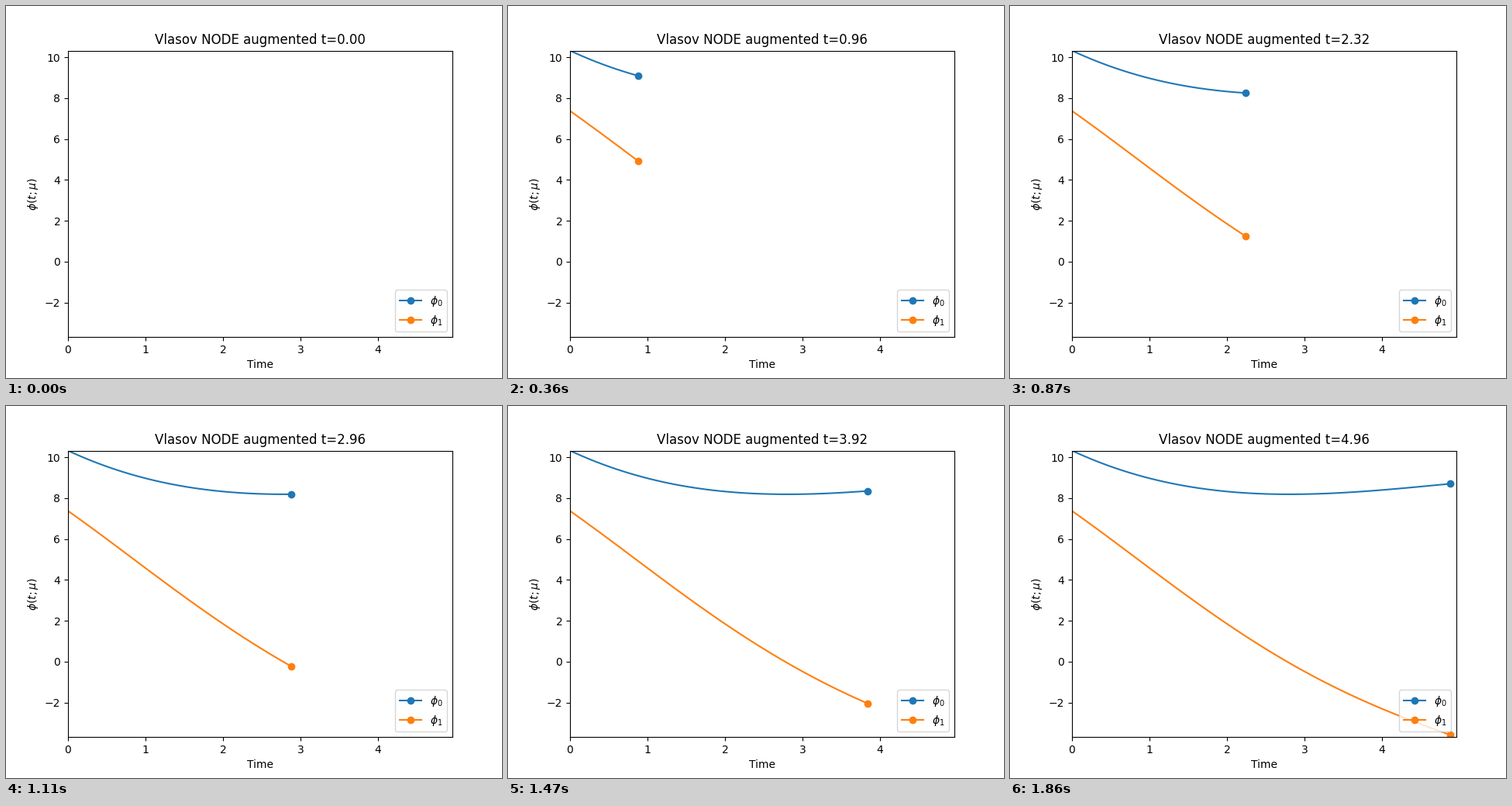
A matplotlib script for the animation above (1890 ms loop, 640 by 480 pixels).

```python
import numpy as np
import matplotlib.pyplot as plt
from matplotlib.animation import FuncAnimation

FRAMES = 63
DT = 0.08
t = np.arange(FRAMES) * DT

phi_0 = 10.327 - 1.7688 * t + 0.4466 * t**2 - 0.0312 * t**3
phi_1 = 7.375 - 2.662 * t - 0.2365 * t**2 + 0.1118 * t**3 - 0.0094 * t**4
curves = [phi_0, phi_1]

fig, ax = plt.subplots(figsize=(6.4, 4.8), dpi=100)
# Only the newest point of each line carries a marker
lines = [
    ax.plot([], [], "-o", markevery=slice(-1, None), label=rf"$\phi_{i}$")[0]
    for i in range(len(curves))
]
ax.set_xlim(t[0], t[-1])
ax.set_ylim(np.min(curves), np.max(curves))
ax.set_xlabel("Time")
ax.set_ylabel(r"$\phi(t;\mu)$")
ax.legend(loc="lower right")
title = ax.set_title("")


def update(k):
    for line, curve in zip(lines, curves):
        line.set_data(t[:k], curve[:k])
    title.set_text(f"Vlasov NODE augmented t={t[k]:.2f}")
    return [*lines, title]


anim = FuncAnimation(fig, update, frames=FRAMES, interval=30,
                     repeat=True, repeat_delay=0)
plt.show()
```
